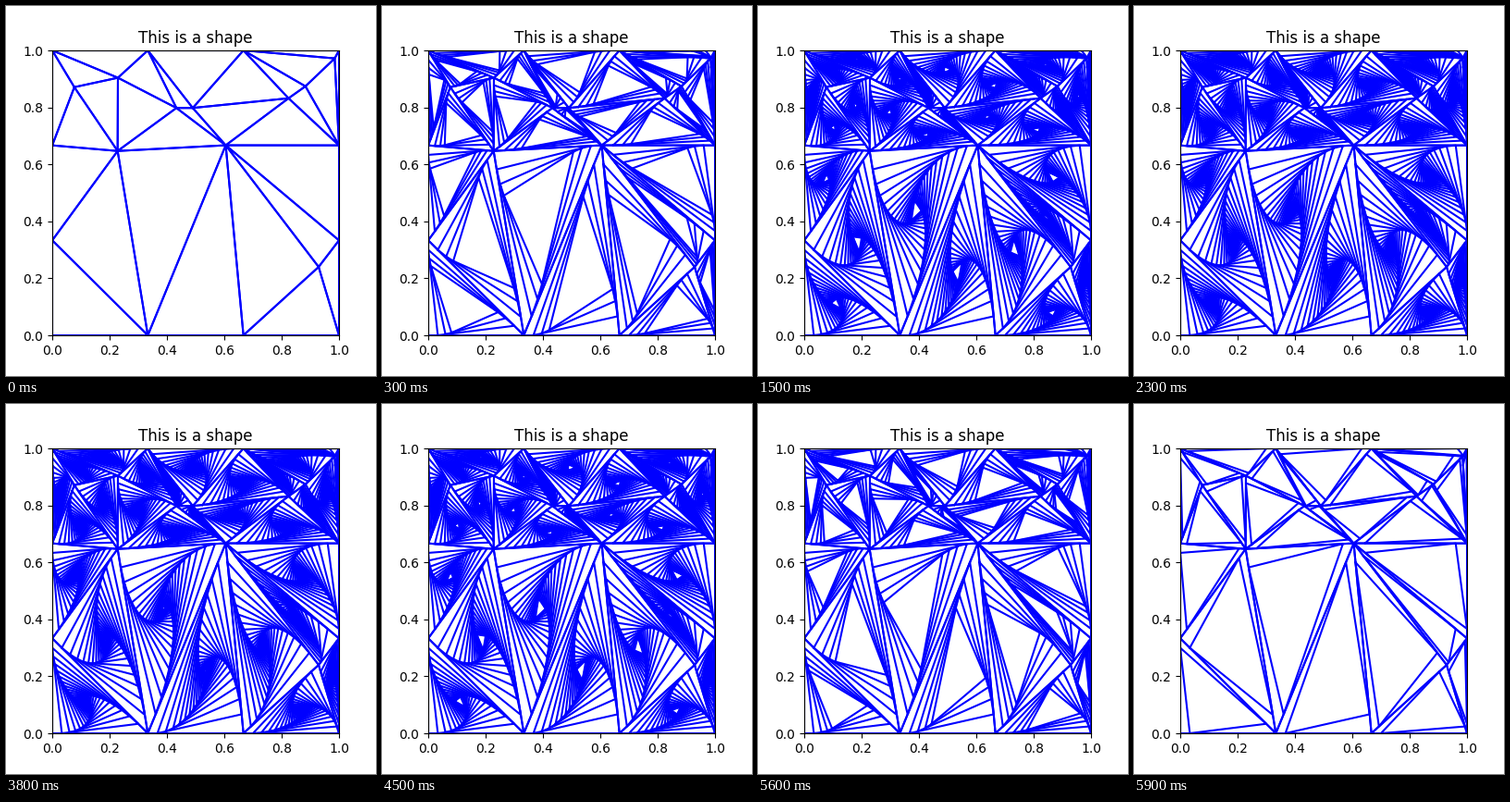
Write a matplotlib script that moves like this. It is 400 px wide and 400 px high and loops after 6000 ms.

```python
import numpy as np
import matplotlib.pyplot as plt
from matplotlib.animation import FuncAnimation
from matplotlib.tri import Triangulation

FRAMES = 60
STEP = 0.1  # share of each side a corner travels per level
THIRD = 1 / 3

border = [(0, 0), (THIRD, 0), (2 * THIRD, 0), (1, 0),
          (1, THIRD), (1, 2 * THIRD), (1, 1),
          (2 * THIRD, 1), (THIRD, 1), (0, 1),
          (0, 2 * THIRD), (0, THIRD)]
inner = [(0.228, 0.647), (0.605, 0.667), (0.077, 0.871), (0.229, 0.904),
         (0.433, 0.798), (0.490, 0.798), (0.824, 0.832), (0.883, 0.874),
         (0.985, 0.972), (0.929, 0.240)]
points = np.array(border + inner)


def counterclockwise(tri):
    (ax_, ay), (bx, by), (cx, cy) = tri
    area = (bx - ax_) * (cy - ay) - (by - ay) * (cx - ax_)
    return tri if area > 0 else tri[::-1]


def whirl(tri):
    """Move every corner a little towards the next one."""
    return (1 - STEP) * tri + STEP * np.roll(tri, -1, axis=0)


fig, ax = plt.subplots(figsize=(4, 4), dpi=100)
ax.set_xlim(0, 1)
ax.set_ylim(0, 1)
ax.set_title("This is a shape")

mesh = Triangulation(points[:, 0], points[:, 1])
shapes = [counterclockwise(points[t]) for t in mesh.triangles]

levels = []
for _ in range(FRAMES // 2 + 1):
    lines = []
    for tri in shapes:
        loop = np.vstack([tri, tri[:1]])
        lines += ax.plot(loop[:, 0], loop[:, 1], color="blue", lw=1.5)
    levels.append(lines)
    shapes = [whirl(tri) for tri in shapes]


def draw(frame):
    depth = min(frame, FRAMES - frame)
    for level, lines in enumerate(levels):
        for line in lines:
            line.set_visible(level <= depth)
    return []


anim = FuncAnimation(fig, draw, frames=FRAMES, interval=100,
                     repeat=True, repeat_delay=0, blit=False)
plt.show()
```
